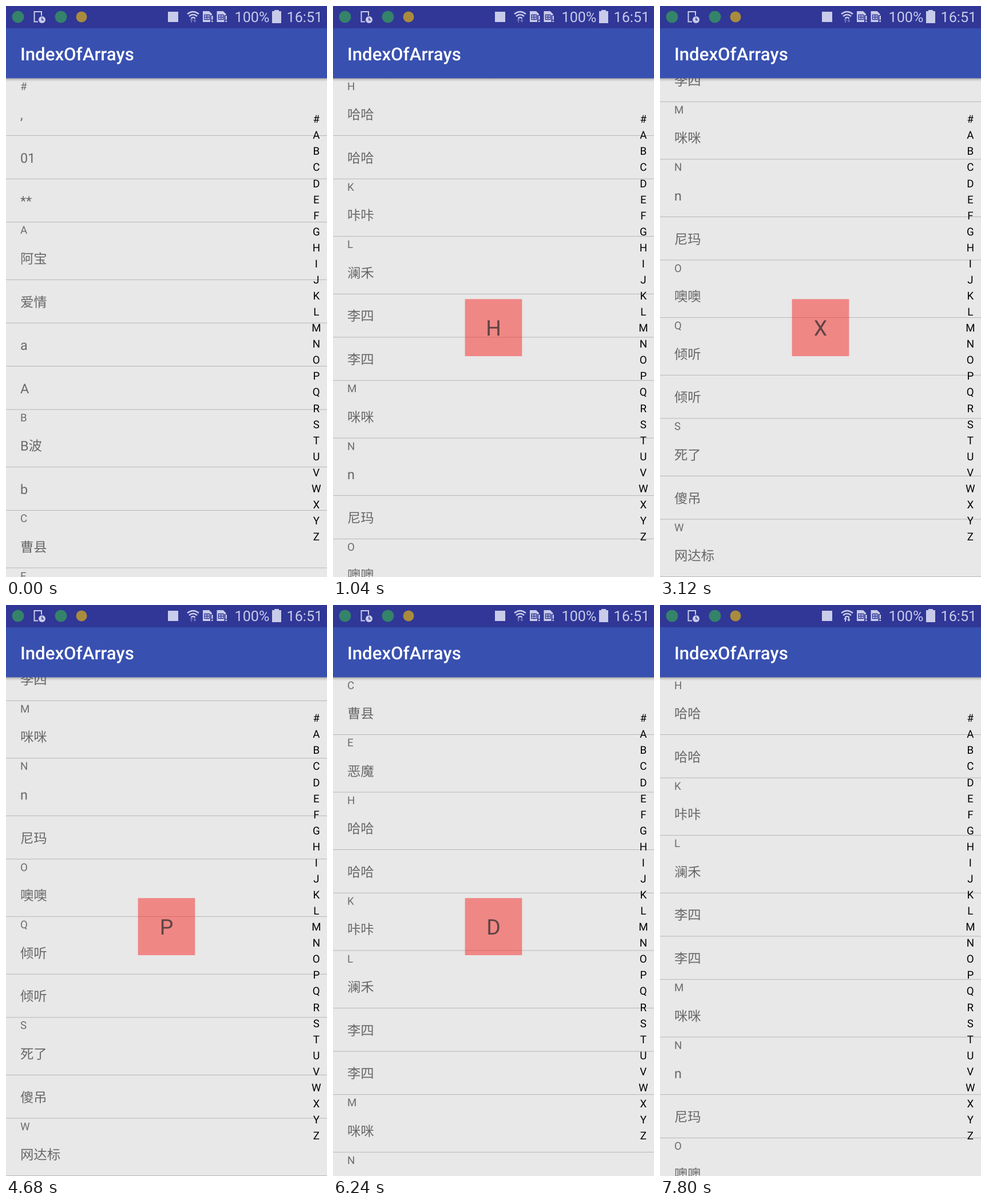
An HTML page for the animation above (8 s loop, 561 by 998 pixels).

```html
<!DOCTYPE html>
<html lang="zh-CN">
<head>
<meta charset="utf-8">
<title>IndexOfArrays</title>
<style>
  html, body { margin: 0; width: 100%; height: 100%; overflow: hidden; background: #e8e8e8; }
  svg { display: block; width: 561px; height: 998px; font-family: Roboto, "Noto Sans CJK SC", "Noto Sans CJK", sans-serif; }
  text { text-rendering: geometricPrecision; }
  .item { font-size: 30px; fill: #686868; }
  .head { font-size: 24px; fill: #6c6c6c; }
  .line { fill: #a9a9a9; }
  .index { font-size: 24px; text-anchor: middle; fill: #000; }
  .title { font-size: 40px; font-weight: 500; fill: #fff; }
  .status { font-size: 25.2px; fill: #c9cbea; }
  .letter { font-size: 48px; text-anchor: middle; fill: #5e4443; }
</style>
</head>
<body>
<!-- Drawn in the phone's own 720 x 1280 pixels -->
<svg viewBox="0 0 720 1280" preserveAspectRatio="none">
  <defs>
    <linearGradient id="shade" x2="0" y2="1">
      <stop offset="0" stop-opacity=".32"/>
      <stop offset=".4" stop-opacity=".11"/>
      <stop offset="1" stop-opacity="0"/>
    </linearGradient>
    <g id="sim">
      <path d="M0 0H11L16 5V19H0Z" fill="#c9cbea"/>
      <path d="M3 6.5H11.500V14.5H3ZM3 10.5H11.500M7.250 6.5V14.5" fill="none" stroke="#303796" stroke-width="1.3"/>
      <path d="M13 7H19V20H13Z" fill="#303796"/>
      <path d="M15 8H17.500V15H15ZM15 16.5H17.500V19H15Z" fill="#c9cbea"/>
    </g>
  </defs>
  <rect width="720" height="1280" fill="#e8e8e8"/>
  <g id="list"></g>
  <g id="index"></g>

  <rect y="162" width="720" height="8" fill="url(#shade)"/>
  <rect width="720" height="50" fill="#303796"/>
  <rect y="50" width="720" height="112" fill="#3850b0"/>
  <text class="title" x="32" y="122">IndexOfArrays</text>

  <g transform="scale(1.2834 1.2826)">
    <circle cx="21" cy="19" r="10.5" fill="#34836a"/>
    <circle cx="96" cy="19" r="10.5" fill="#34836a"/>
    <circle cx="132" cy="19" r="9.5" fill="#a98b3e"/>
    <rect x="283" y="10" width="18" height="18" fill="#c9cbea"/>
    <g fill="none" stroke="#c9cbea" stroke-width="2">
      <path d="M56 27.5H49.500V10H62V17"/>
      <path d="M317 14Q327 6 337 14M320 18Q327 12 334 18M323.500 21.500Q327 18.500 330.500 21.500" stroke-width="2.500"/>
    </g>
    <circle cx="63" cy="24" r="6" fill="#c9cbea"/>
    <path d="M63 20.500V24.500H66" fill="none" stroke="#303796" stroke-width="1.5"/>
    <path id="arrows" d="M321 25L324 21L327 25H325V29H323V25ZM327 25H329V21H331V25H333L330 29Z" fill="#c9cbea"/>
    <use href="#sim" x="344" y="9"/>
    <use href="#sim" x="368.500" y="9"/>
    <text class="status" x="399.500" y="28.300">100%</text>
    <path d="M469 7H477V9H481V30H465V9H469Z" fill="#c9cbea"/>
    <text class="status" x="490.500" y="28.300">16:51</text>
  </g>

  <g id="popup">
    <rect x="296" y="657" width="128" height="128" fill="#f82824" fill-opacity=".5"/>
    <text class="letter" x="360" y="739"></text>
  </g>
</svg>
<script>
const SECTIONS = {
  '#': [',', '01', '**'], A: ['阿宝', '爱情', 'a', 'A'], B: ['B波', 'b'], C: ['曹县'],
  E: ['恶魔'], H: ['哈哈', '哈哈'], K: ['咔咔'], L: ['澜禾', '李四', '李四'], M: ['咪咪'],
  N: ['n', '尼玛'], O: ['噢噢'], Q: ['倾听', '倾听'], S: ['死了', '傻吊'], W: ['网达标']
};
const LETTERS = '#ABCDEFGHIJKLMNOPQRSTUVWXYZ';
const TOP = 162, BOTTOM = 1280, HEAD = 32, ROW = 97;
const LOOP = 8000, STEP = 520;
const TOUCHES = '#DHLPTXZUPLHD#DH';   // letter under the finger at each step

const $ = id => document.getElementById(id);
const list = $('list'), popup = $('popup'), arrows = $('arrows');
const letter = popup.querySelector('text');

function add(parent, tag, attrs, text = '') {
  const el = document.createElementNS('http://www.w3.org/2000/svg', tag);
  for (const key in attrs) el.setAttribute(key, attrs[key]);
  el.textContent = text;
  parent.append(el);
}

const offsets = {};
let y = TOP;
for (const [name, items] of Object.entries(SECTIONS)) {
  offsets[name] = y - TOP;
  add(list, 'text', { class: 'head', x: 32, y: y + 26 }, name);
  y += HEAD;
  for (const item of items) {
    add(list, 'text', { class: 'item', x: 32, y: y + 60 }, item);
    y += ROW;
    add(list, 'rect', { class: 'line', x: 0, y: y - 1, width: 720, height: 1 });
  }
}
const maxScroll = y - BOTTOM;

[...LETTERS].forEach((ch, i) =>
  add($('index'), 'text', { class: 'index', x: 696, y: 262 + i * 36 }, ch));

// A letter without a section keeps the nearest one before it.
function scrollFor(ch) {
  let i = LETTERS.indexOf(ch);
  while (!(LETTERS[i] in offsets)) i--;
  return Math.min(offsets[LETTERS[i]], maxScroll);
}

const start = performance.now();
let shown = -1;
function draw(now) {
  const step = Math.floor(Math.max(0, now - start) % LOOP / STEP);
  if (step !== shown) {
    shown = step;
    const ch = TOUCHES[step], last = step === TOUCHES.length - 1;
    list.setAttribute('transform', `translate(0 ${-scrollFor(ch)})`);
    letter.textContent = ch;
    popup.style.display = step === 0 || last ? 'none' : '';
    arrows.style.opacity = last ? 1 : 0.4;
  }
  requestAnimationFrame(draw);
}
draw(start);
</script>
</body>
</html>
```
